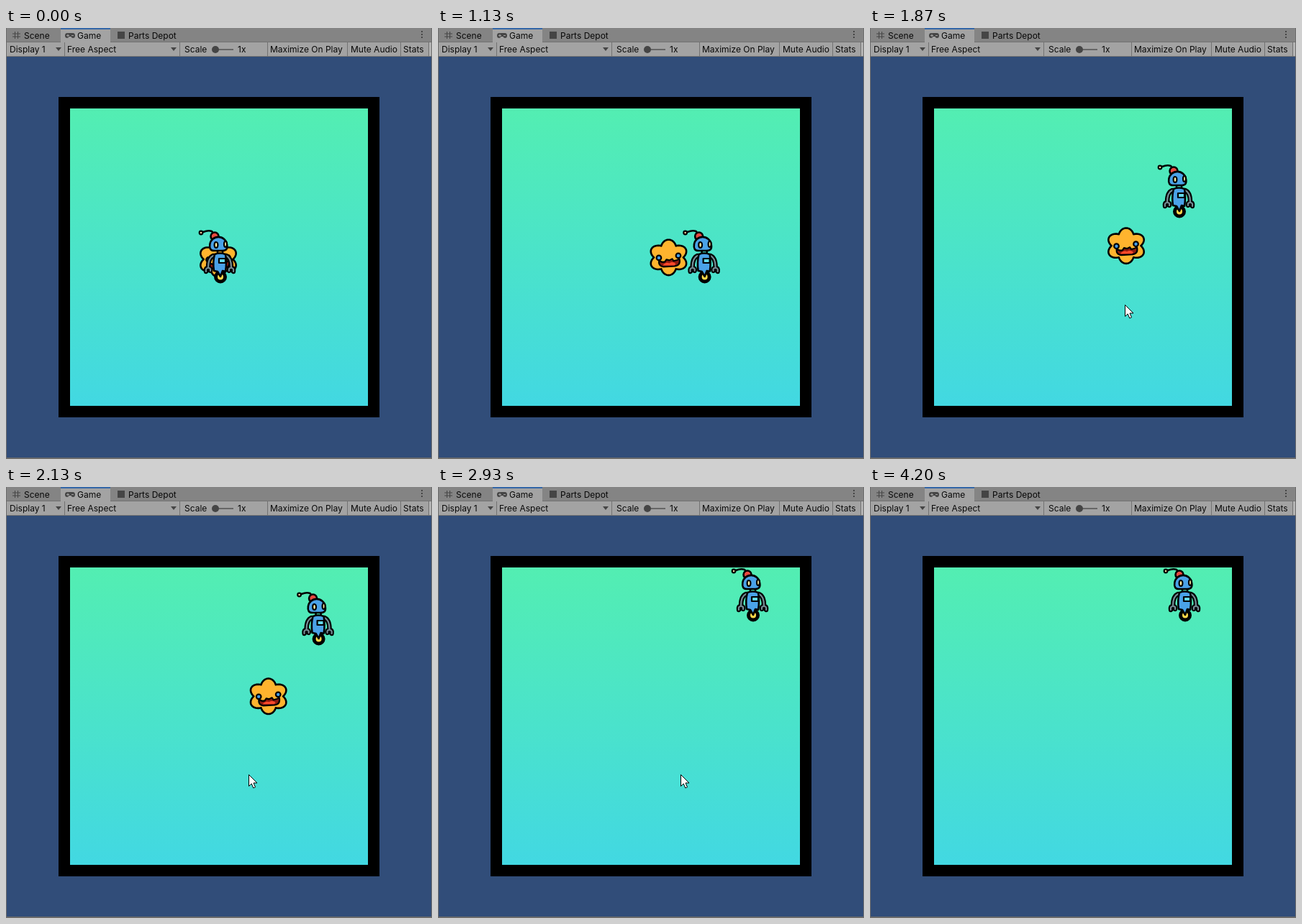
An HTML page for the animation above (5590 ms loop, 592x600 px).

```html
<!DOCTYPE html>
<html lang="en">
<head>
<meta charset="utf-8">
<title>Robot chase</title>
<style>
  html, body { margin: 0; width: 100%; height: 100%; overflow: hidden; background: #314d79; }
  svg { display: block; }
  text { font: 12px Inter, Roboto, sans-serif; fill: #080808; white-space: pre; }
  .ink { stroke: #000; stroke-width: 2.6; stroke-linejoin: round; stroke-linecap: round; }
  .arm { fill: none; stroke-width: 6.4; }
  .arm.skin { stroke: #758c94; stroke-width: 2.2; }
</style>
</head>
<body>
<svg width="592" height="600" viewBox="0 0 592 600">
  <defs>
    <linearGradient id="sky" x2="0" y2="1">
      <stop stop-color="#53eeb2"/>
      <stop offset="1" stop-color="#42d8e2"/>
    </linearGradient>
    <path id="limb" d="M-9-1Q-16 2-16 15M-19 21Q-20 16-16 16T-13 20"/>
    <g id="arm"><use href="#limb" class="arm"/><use href="#limb" class="arm skin"/></g>
  </defs>

  <!-- Game view -->
  <rect width="592" height="600" fill="#314d79"/>
  <rect x="73" y="96" width="446" height="446"/>
  <rect x="89" y="112" width="414" height="414" fill="url(#sky)"/>

  <g id="star" class="ink">
    <path id="petals" fill="#ffb42e"/>
    <path fill="#8e1b10" stroke-width="2.2" d="M-13 3Q-11 8-5 6L-3 3 1 4 5 2 7 5Q12 4 15 2 17 11 9 12L-7 13Q-15 12-13 3Z"/>
    <path fill="#ff4a2a" stroke="none" d="M-8 11Q-4 6 1 8 6 5 10 9L8 11Z"/>
    <g fill="#459ee8" stroke-width="2.200">
      <circle cx="-13.500" cy=".5" r="3.300"/>
      <circle cx="13.500" cy="-2.500" r="3.300"/>
    </g>
  </g>

  <g id="robot" class="ink" fill="#4aa2e8">
    <circle cx="1" cy="28.500" r="6.500" fill="#ffd94a" stroke-width="5"/>
    <use href="#arm"/>
    <use href="#arm" transform="scale(-1 1)"/>
    <path d="M-3-8V-4M4-8V-4"/>
    <path d="M-7-3Q0-6 8-3 10 9 8 21L4 20 1 28-3 21-8 20Q-10 8-7-3Z"/>
    <rect x="-1" y="3" width="9" height="6" fill="#64d9ea" stroke-width="2.200"/>
    <path fill="none" d="M-23-34Q-16-37-11-35L-8-31"/>
    <circle cx="-26" cy="-33" r="2.300" fill="#ffd9a0" stroke-width="2.200"/>
    <circle cx="-7" cy="-28" r="5.500" fill="#e8493f"/>
    <path d="M-13.700-17A12 12 0 0 1 10-17Q12-8 4-8H-8Q-15-8-13.700-17Z"/>
    <g fill="#fff0a0" stroke-width="2.200">
      <ellipse cx="-5" cy="-16" rx="2.400" ry="4"/>
      <ellipse cx="8" cy="-17" rx="2" ry="4"/>
    </g>
  </g>

  <!-- Tabs and toolbar -->
  <rect width="592" height="20" fill="#848484"/>
  <rect x="76" width="69" height="20" fill="#a3a3a3"/>
  <rect x="76" width="69" height="2" fill="#3668a8"/>
  <rect y="19" width="592" height="21" fill="#a3a3a3"/>
  <path d="M0 19.500H76M145 19.500H592M0 39.500H592M81.500 20V39M241.500 20V39M363.500 20V39M474.500 20V39M548.500 20V39M587.500 20V39" stroke="#727272"/>
  <rect x="588" y="20" width="3" height="19" fill="#b4b4b4"/>
  <path d="M.5 0V600M591.500 0V600M0 598.500H592M0 599.500H592" stroke="#6c6c6c"/>
  <g fill="#454545">
    <path d="M12.500 5V15M16.500 5V15M9 8H20M9 12H20" stroke="#454545"/>
    <path d="M85 7H93Q96 7 96 10.500T93 14Q91 14 90.500 12H87.500Q87 14 85 14 82 14 82 10.500T85 7Z"/>
    <path d="M84 10.500H88M86 8.500V12.500M91 10.500H94" stroke="#a3a3a3"/>
    <rect x="155" y="5" width="10" height="10"/>
    <path d="M69 27h8l-4 5zM229 27h8l-4 5z"/>
    <path d="M291 30H316" stroke="#666" stroke-width="2"/>
    <circle cx="291" cy="30" r="5"/>
    <path d="M578 4V14" stroke="#454545" stroke-width="2" stroke-dasharray="2"/>
  </g>
  <text x="25" y="15">Scene</text>
  <text x="99" y="15">Game</text>
  <text x="170" y="15">Parts Depot</text>
  <text x="5" y="34">Display 1</text>
  <text x="85" y="34">Free Aspect</text>
  <text x="248" y="34">Scale</text>
  <text x="322" y="34">1x</text>
  <text x="367" y="34">Maximize On Play</text>
  <text x="479" y="34">Mute Audio</text>
  <text x="552" y="34">Stats</text>

  <path id="cursor" d="M.5.5V16.500L4.200 13 6.800 19 9.500 17.800 7 12H12Z" fill="#fff" stroke="#000"/>
</svg>
<script>
  const LOOP = 5590, START = 730, STEP = 200 / 3;
  const STAR_SPEED = 3.67, STAR_END = 33;

  // Turning points as [step, x, y].
  const robotTurns = [[-1, 297, 318], [7, 380, 318], [11, 415, 291.5], [17, 429, 227], [24, 437, 150]];
  const cursorTurns = [[10, 584, 85], [11, 564, 139], [17, 354, 385], [20, 337, 400], [44, 337, 400], [51, 132, 590]];

  const byId = id => document.getElementById(id);

  function along(turns, step) {
    const next = turns.findIndex(turn => turn[0] > step);
    if (next < 0) return turns.at(-1).slice(1);
    const [s0, x0, y0] = turns[Math.max(next - 1, 0)], [s1, x1, y1] = turns[next];
    const k = Math.max(0, (step - s0) / (s1 - s0));
    return [x0 + (x1 - x0) * k, y0 + (y1 - y0) * k];
  }

  // The star heads for the robot at a constant speed.
  function chase(step) {
    let x = 295, y = 322;
    for (let s = 0; s <= step; s++) {
      const [rx, ry] = along(robotTurns, s);
      const angle = Math.atan2(ry - y, rx - x);
      x += STAR_SPEED * Math.cos(angle);
      y += STAR_SPEED * Math.sin(angle);
    }
    return [x, y];
  }

  function petalOutline() {
    const points = [];
    for (let deg = 0; deg < 360; deg += 3) {
      const a = deg * Math.PI / 180, r = 18.5 + 6.2 * Math.abs(Math.cos(3 * a));
      points.push([1.1 * r * Math.sin(a), -r * Math.cos(a)]);
    }
    return `M${points.join("L")}Z`;
  }

  function place(id, point, visible = true) {
    byId(id).style.display = visible ? "" : "none";
    byId(id).setAttribute("transform", `translate(${point})`);
  }

  function draw() {
    const time = Math.floor(performance.now() % LOOP / 10) * 10;
    const step = Math.max(-1, Math.floor((time - START) / STEP + 1e-6));
    place("robot", along(robotTurns, step));
    place("star", chase(Math.min(step, STAR_END)), step < STAR_END);
    place("cursor", along(cursorTurns, step), step >= 10 && step <= 51);
    requestAnimationFrame(draw);
  }

  byId("petals").setAttribute("d", petalOutline());
  draw();
</script>
</body>
</html>
```
